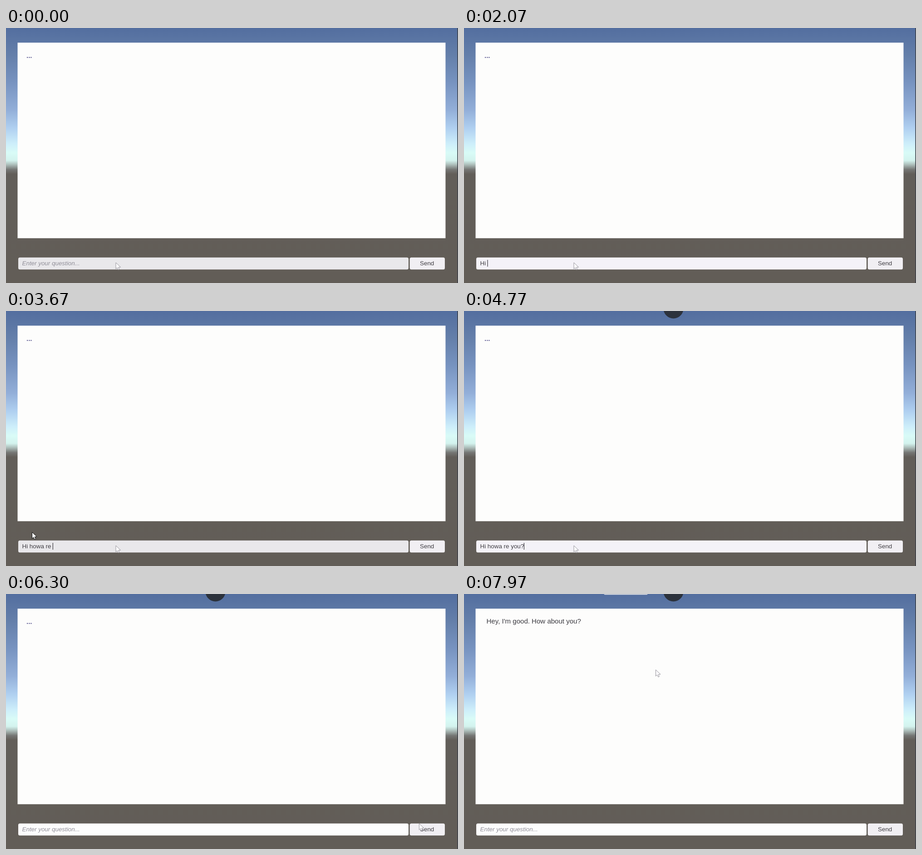
Write an HTML page with a canvas that moves like this. It is 996 by 562 pixels and loops after 8000 ms.

```html
<!DOCTYPE html>
<html lang="en">
<head>
<meta charset="utf-8">
<title>Chat demo</title>
<style>
  html, body { margin: 0; width: 100%; height: 100%; overflow: hidden; background: #605c57; }
  canvas { display: block; width: 996px; height: 562px; }
</style>
</head>
<body>
<canvas id="stage" width="996" height="562"></canvas>
<script>
const ctx = document.getElementById('stage').getContext('2d');
const LOOP = 8000;
const FONT = '"Liberation Sans", Arial, sans-serif';

const sky = ctx.createLinearGradient(0, 0, 0, 562);
[[0, '#536e9f'], [60, '#647faa'], [120, '#7793c0'], [180, '#92aed8'], [220, '#afcff0'],
 [255, '#cdeefa'], [275, '#d9fbf7'], [292, '#d3f3ee'], [301, '#aebfbb'], [312, '#757674'],
 [322, '#625e59'], [562, '#625d57']].forEach(([y, color]) => sky.addColorStop(y / 562, color));

// Typing bursts: start time, text, delay per key
const bursts = [[720, 'Hi ', 140], [2300, 'howa re ', 155], [3800, 'you?', 160]];
const SENT = 6200, ANSWERED = 7450;

// Pointer stops: time, x, y
const stops = [[0, 242, 517], [5150, 242, 517], [5730, 846, 440], [6020, 925, 516],
               [6250, 925, 516], [6750, 422.5, 167]];

// Input background: time, colour
const fieldShades = [[0, '#e9e8eb'], [700, '#f4f2f8'], [3370, '#e9e8eb'],
                     [4200, '#f4f2f8'], [SENT, '#fdfdfd']];

const latest = (list, t) => list.filter(([start]) => start <= t).pop();

function typedText(t) {
  if (t >= SENT) return '';
  return bursts.map(([start, text, delay]) =>
    text.slice(0, Math.max(0, Math.floor((t - start) / delay) + 1))).join('');
}

function pointerAt(t) {
  const from = latest(stops, t);
  const to = stops[stops.indexOf(from) + 1];
  if (!to) return from.slice(1);
  const p = (t - from[0]) / (to[0] - from[0]);
  const ease = p * p * (3 - 2 * p);
  return [from[1] + (to[1] - from[1]) * ease, from[2] + (to[2] - from[2]) * ease];
}

function roundBox(x, y, w, h, radius, fill) {
  ctx.fillStyle = fill;
  ctx.beginPath();
  ctx.roundRect(x, y, w, h, radius);
  ctx.fill();
}

function label(text, x, y, size, color, style = '') {
  ctx.font = `${style} ${size}px ${FONT}`;
  ctx.fillStyle = color;
  ctx.fillText(text, x, y);
}

function arrow(x, y, stroke, fill) {
  ctx.save();
  ctx.translate(x, y);
  ctx.beginPath();
  [[0, 0], [0, 14], [3.2, 11.2], [5.5, 16], [7.8, 15], [5.8, 10.3], [10.5, 10]]
    .forEach(([px, py]) => ctx.lineTo(px, py));
  ctx.closePath();
  ctx.fillStyle = fill;
  ctx.fill();
  ctx.strokeStyle = stroke;
  ctx.lineWidth = 1;
  ctx.stroke();
  ctx.restore();
}

function drawBackdrop(t) {
  ctx.fillStyle = sky;
  ctx.fillRect(0, 0, 996, 562);
  ctx.fillStyle = '#3d4148';
  ctx.fillRect(994.5, 0, 1.5, 562);
  ctx.fillStyle = '#fdfdfc';
  ctx.fillRect(25.5, 32.3, 943, 431);
  if (t >= 4600) {
    ctx.fillStyle = '#2c323c';
    ctx.beginPath();
    ctx.arc(461.5, -5.5, 22, 0, Math.PI * 2);
    ctx.fill();
  }
  if (t >= 6400) roundBox(308, -8, 97, 9.5, 3, '#e6e6ea');
}

function drawInput(t) {
  roundBox(27, 505.7, 860, 26.5, 3.5, latest(fieldShades, t)[1]);
  const text = typedText(t);
  if (text) {
    label(text, 35.5, 523, 13.4, '#403e44');
    if (t < 4900) {
      ctx.fillStyle = '#36343a';
      ctx.fillRect(35 + ctx.measureText(text).width, 511, 1.2, 15);
    }
  } else {
    label('Enter your question...', 35.5, 523, 13.4, '#908e98', 'italic');
  }
  const pressed = t >= 6100 && t < 6230;
  roundBox(889.7, 505.7, 77.3, 26.5, 3.5, pressed ? '#d0ced4' : '#f1eff3');
  label('Send', 912, 523.3, 13.4, '#403e44');
}

function draw(t) {
  drawBackdrop(t);
  if (t < ANSWERED) label('...', 45, 66, 15, '#5c5a92', 'bold');
  else label("Hey, I'm good. How about you?", 49.5, 65.2, 15.05, '#3c3b41');
  drawInput(t);
  arrow(...pointerAt(t), '#96949b', '#fbfafc');
  if (t >= 3450 && t < 4000) arrow(57.5, 487.5, '#111', '#fff');
}

function tick(now) {
  draw(now % LOOP);
  requestAnimationFrame(tick);
}
draw(0);
requestAnimationFrame(tick);
</script>
</body>
</html>
```
